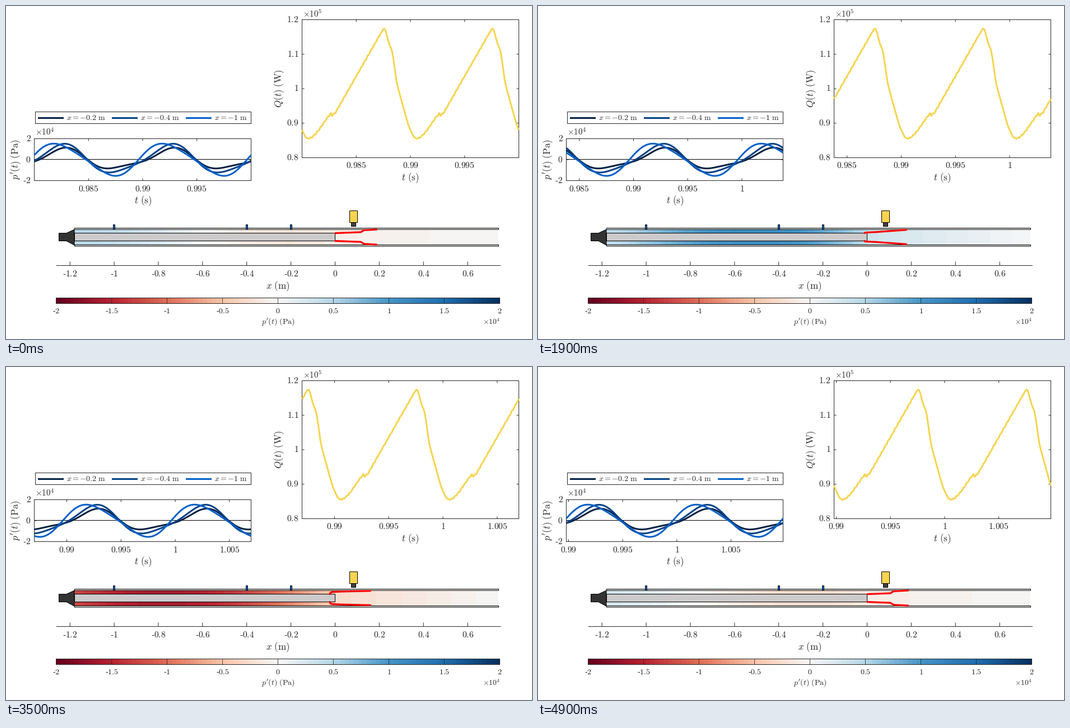
Animation, 939 px wide and 596 px high, one loop 5 s. Source, as a matplotlib script:

```python
import numpy as np
import matplotlib.pyplot as plt
from matplotlib.animation import FuncAnimation
from matplotlib.colors import LinearSegmentedColormap
from matplotlib.patches import Polygon, Rectangle

plt.rcParams["mathtext.fontset"] = "cm"

W, H, DPI = 939, 596, 64
FRAMES, INTERVAL = 50, 100
PT = 72 / DPI                      # points per pixel
SPAN, T_START, T_STEP = 0.02, 0.98, 0.0002
WIDTH = 387                        # panel width, two oscillation periods
PERIOD = WIDTH / 2
INK, YELLOW = "#262626", "#f6d450"
STATIONS = {-0.2: "#001f42", -0.4: "#004086", -1: "#0060c8"}
CMAP = LinearSegmentedColormap.from_list(
    "pressure", ["#67001f", "#b92332", "#de7058", "#fac6aa", "#f7f7f7",
                 "#b6d7e8", "#4696c8", "#1f6fb1", "#053061"], 100)

fig = plt.figure(figsize=(W / DPI, H / DPI), dpi=DPI, facecolor="white")
ax = fig.add_axes([0, 0, 1, 1])
ax.axis("off")


def text(x, y, s, size, ha="center", va="center", **kw):
    return ax.text(x, y, f"${s}$", fontsize=size * PT, ha=ha, va=va, color=INK, **kw)


def number(v):
    return r"\mathrm{%s}" % f"{v:g}".replace("-", "\u2010")


def line(x, y, color=INK, width=1, cap="butt", **kw):
    return ax.plot(x, y, color=color, lw=width * PT, snap=False,
                   solid_capstyle=cap, **kw)[0]


def box(x0, y0, x1, y1, fill="none", edge=INK, z=2):
    ax.add_patch(Rectangle((x0, y0), x1 - x0, y1 - y0, fc=fill, ec=edge, lw=PT,
                           zorder=z, joinstyle="miter", snap=False))


# ---- physics ----
def pressure(x, theta):
    """Standing wave with one overtone, in units of 1e4 Pa."""
    main = 1.62 * np.cos(1.7 * (x + 0.77)) * np.cos(theta - 1.7 - 0.33 * x)
    overtone = -0.26 * np.cos(3.4 * (x + 0.3)) * np.cos(2 * theta - 0.95)
    return main + overtone


def duct_pressure(x, theta):
    outlet = 0.7 * pressure(0, theta) * (1 - x / 0.76)
    return np.where(x < 0, pressure(x, theta), outlet)


# slow growth and steep fall of the heat release: pixel offset -> pixel row
HEAT_KEYS = np.array([(6, 235), (12, 238), (19, 234), (27, 226), (49, 194.5), (58, 193.5),
                      (145, 41), (148, 39), (155, 67), (161, 80), (169, 138), (181, 182),
                      (190, 214)]).T


def heat(u):
    smooth = np.mean([np.interp(u + d, *HEAT_KEYS, period=PERIOD)
                      for d in np.linspace(-2, 2, 5)], axis=0)
    u = u % PERIOD
    rising = (u > 14) & (u < 138)
    bump = 0.9 + 2 * np.exp(-((u - 52.5) / 3) ** 2)
    return smooth - rising * bump * np.cos(2 * np.pi * (u - 51) / 6)


def flame_front(n):
    """Upper flame sheet: a kink runs downstream, then the root flashes back."""
    m = (n - 42) % FRAMES
    tip = 657 + 7 * np.cos(2 * np.pi * (n - 7) / FRAMES)
    if m < 20:
        kink = 596 + 64 * np.sin(np.pi * m / 40)
        run = kink - 588
        low, high = 0.038 * run, 4.4 + 0.02 * run
        x = [588, kink, kink + 2.5, kink + 6, max(tip, kink + 7)]
        height = [0, low, (low + high) / 2, high, 6.5]
    else:
        root = 588 - np.interp(m, [21, 36, 41, 50], [0, 13, 13, 0])
        rise = (m - 20) / 6
        x = [root, root + 1, root + 4, root + 20, tip]
        height = [0, 0.6 * rise, rise, rise + 0.7, 5.8]
    return np.array(x), 406.5 - np.array(height)


# ---- panels ----
class Panel:
    def __init__(self, x0, y0, y1, label_y, values):
        self.x0, self.y0, self.y1 = x0, y0, y1
        box(x0, y0, x0 + WIDTH, y1, z=3)
        self.ticks = line([], [], zorder=3)
        self.labels = [text(0, label_y, "0", 15.5) for _ in range(5)]
        for y, v in zip(np.linspace(y1, y0, len(values)), values):
            for x in (x0, x0 + WIDTH - 4):
                line([x, x + 4], [y, y])
            text(x0 - 6, y, number(v), 15.5, ha="right")

    def update(self, t0):
        first = int(np.floor(t0 / 0.005 + 1e-6)) + 1
        xs, ys = [], []
        for i, label in enumerate(self.labels):
            t = round((first + i) * 0.005, 3)
            visible = t < t0 + SPAN - 1e-6
            label.set_visible(visible)
            if visible:
                x = self.x0 + (t - t0) / SPAN * WIDTH
                label.set_x(x)
                label.set_text(f"${number(t)}$")
                xs += [x, x, np.nan, x, x, np.nan]
                ys += [self.y0, self.y0 + 4, np.nan, self.y1 - 4, self.y1, np.nan]
        self.ticks.set_data(xs, ys)


P_ZERO, P_UNIT = 274.5, 18.75
p_panel = Panel(50.5, 237.5, 312.5, 327.5, [-2, 0, 2])
line([50.5, 437.5], [P_ZERO, P_ZERO], "black")
text(52, 232, r"\times10^4", 15, ha="left", va="baseline")
text(17.5, 274.5, r"p'(t)\ \mathrm{(Pa)}", 17, rotation=90)
text(244.5, 349, r"t\ \mathrm{(s)}", 17)

q_panel = Panel(528.5, 24.5, 271.5, 286, [0.8, 0.9, 1, 1.1, 1.2])
text(530, 20, r"\times10^5", 15, ha="left", va="baseline")
text(488, 148, r"Q(t)\ \mathrm{(W)}", 17, rotation=90)
text(722, 308, r"t\ \mathrm{(s)}", 17)

traces = {x: line([], [], c, 3, zorder=4) for x, c in STATIONS.items()}
heat_trace = line([], [], YELLOW, 3, zorder=4)

box(52.5, 189.5, 437.5, 210.5)
for left, (x, color) in zip((57, 189, 321), STATIONS.items()):
    line([left, left + 46], [200.5, 200.5], color, 3)
    text(left + 51, 200.5, r"x={-}%g\ \mathrm{m}" % -x, 14, ha="left")

# ---- position axis and colour bar ----
SCALE, X_ZERO = 394.4, 587.5
line([90, 883], [464.5, 464.5])
for v in np.arange(-6, 4) / 5:
    x = X_ZERO + v * SCALE
    line([x, x], [457.5, 464.5])
    text(x, 480, number(v), 15.5)
text(485.5, 501.5, r"x\ \mathrm{(m)}", 17)


def strip(values, x0, y0, x1, y1):
    return ax.imshow(values[None, :], extent=(x0, x1, y1, y0), cmap=CMAP, vmin=-2, vmax=2,
                     aspect="auto", interpolation="nearest", zorder=1)


strip(np.linspace(-2, 2, 400), 90, 522.5, 882, 532.5)
box(89.5, 522.5, 881.5, 532.5)
for v in np.arange(-4, 5) / 2:
    x = 485.5 + v * 198
    line([x, x], [522.5, 532.5], width=.8)
    text(x, 546, number(v), 14)
text(486, 565, r"p'(t)\ \mathrm{(Pa)}", 14)
text(882, 570, r"\times10^4", 13.5, ha="right", va="baseline")

# ---- duct ----
DUCT_X = (np.linspace(122, 879, 190) - X_ZERO) / SCALE
duct = strip(np.zeros(190), 122, 400, 879, 428)
for y in (397.5, 427.5):
    box(122.5, y, 879.5, y + 2.5, "#dfe4df", "black")
box(122.5, 406.5, 587.5, 420.5, "#cccacb", "black")
ax.add_patch(Polygon([(94.5, 406.5), (108, 406.5), (122, 400), (122, 428), (108, 420.5),
                      (94.5, 420.5)], fc="#333333", ec="black", lw=PT, zorder=3))
for x in STATIONS:
    centre = round(X_ZERO + x * SCALE)
    box(centre - 1.5, 391.5, centre + 1.5, 399.5, "#0066cc", "black", 3)
box(616.5, 387.5, 624.5, 394.5, "#404040", "black", 3)
box(613.5, 366.5, 627.5, 387.5, YELLOW, "black", 3)
flames = [line([], [], "red", 3.2, "round", zorder=5, solid_joinstyle="round")
          for _ in range(2)]

ax.set_xlim(0, W)
ax.set_ylim(H, 0)
LOCAL = np.linspace(0, WIDTH, 2 * WIDTH + 1)


def update(n):
    t0 = T_START + n * T_STEP
    u = LOCAL + n * T_STEP / SPAN * WIDTH
    for panel in (p_panel, q_panel):
        panel.update(t0)
    for x, trace in traces.items():
        trace.set_data(p_panel.x0 + LOCAL,
                       P_ZERO - P_UNIT * pressure(x, 2 * np.pi * u / PERIOD))
    heat_trace.set_data(q_panel.x0 + LOCAL, heat(u))
    duct.set_data(duct_pressure(DUCT_X, 2 * np.pi * n / FRAMES)[None, :])
    x, y = flame_front(n)
    flames[0].set_data(x, y)
    flames[1].set_data(x, 827 - y)
    return []


anim = FuncAnimation(fig, update, frames=FRAMES, interval=INTERVAL, repeat=True,
                     repeat_delay=0, init_func=lambda: update(0))
plt.show()
```
